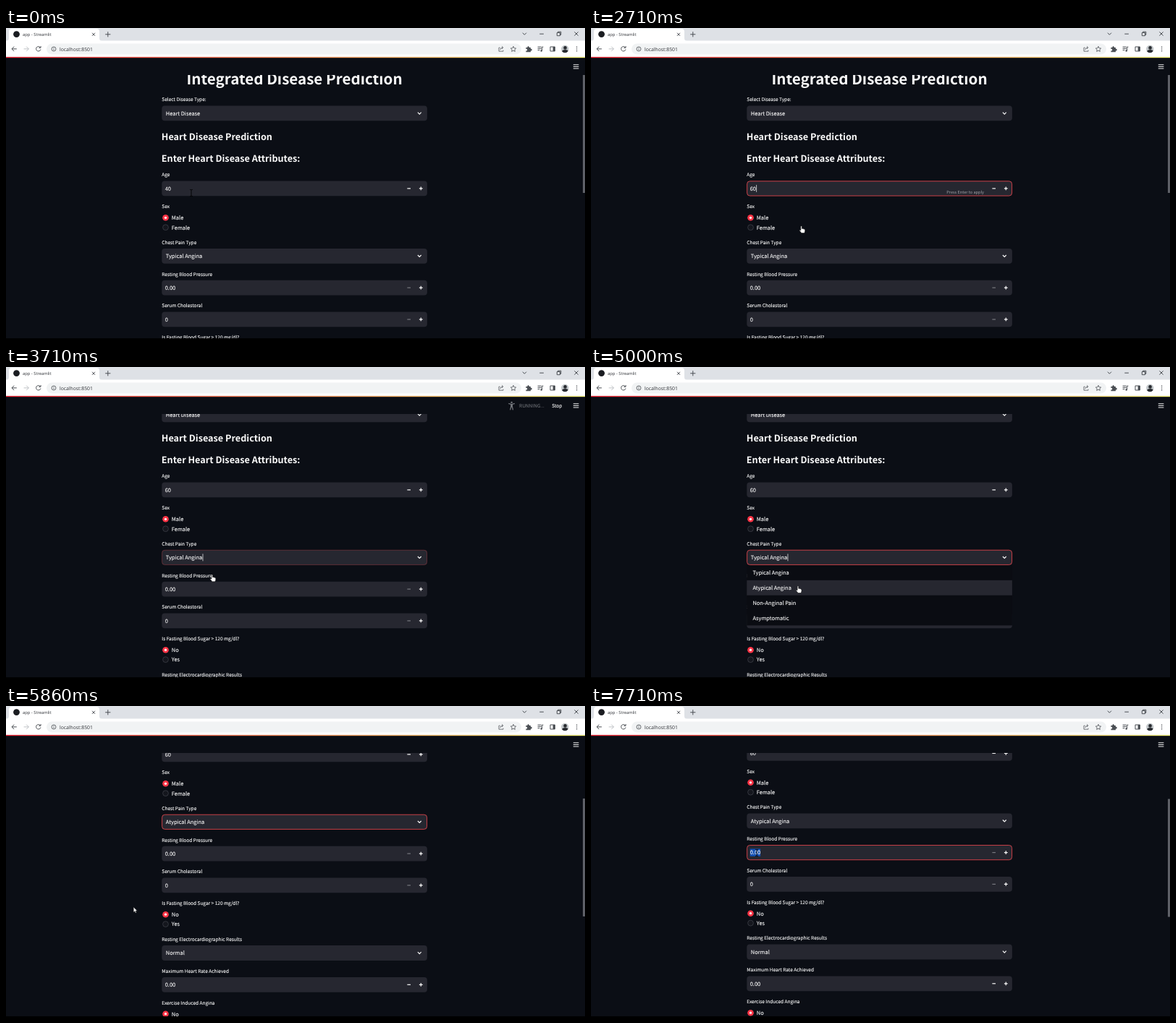
Recreate the animation shown at these times as an HTML page. Size 800x430 px, loop 8000 ms.

```html
<!DOCTYPE html>
<html lang="en">
<head>
<meta charset="utf-8">
<title>Disease prediction form</title>
<style>
  html, body { margin: 0; width: 100%; height: 100%; overflow: hidden; background: #0b0e15; }
  svg { display: block; width: 800px; height: 430px; }
  text { font-family: "Noto Sans CJK JP", "Noto Sans CJK SC", "Noto Sans CJK", "Noto Sans", sans-serif;
         fill: #fafafa; text-rendering: geometricPrecision; white-space: pre; }
  .h1 { font-size: 20.6px; font-weight: 700; }
  .h3 { font-size: 12.67px; font-weight: 700; }
  .label { font-size: 6.52px; stroke: #fafafa; stroke-width: .12px; }
  .value { font-size: 7.45px; stroke: #fafafa; stroke-width: .1px; }
  .hint { font-size: 5.6px; fill: #a2a3a8; text-anchor: end; }
  .ui { font-family: "Open Sans", "Noto Sans", sans-serif; fill: #303338; }
  .line { fill: none; stroke: #4b4f54; stroke-width: 1; }
  .box { fill: #262730; }
  .ring { fill: none; stroke: #f0464c; stroke-width: .8; }
</style>
</head>
<body>
<svg viewBox="0 0 800 430">
  <defs>
    <linearGradient id="stripe">
      <stop offset="0" stop-color="#ff2b3c"/><stop offset="1" stop-color="#fffd80"/>
    </linearGradient>
    <clipPath id="face"><circle cx="772.3" cy="29" r="5.2"/></clipPath>
  </defs>
  <rect width="800" height="430" fill="#0b0e15"/>
  <g id="page"></g>

  <g id="header">
    <rect y="40" width="800" height="25" fill="#0b0e15"/>
    <rect y="39.8" width="800" height="1.4" fill="url(#stripe)"/>
    <path d="M783.8 50.8h7.6M783.8 53.4h7.6M783.8 56h7.6" stroke="#f0f0f0" stroke-width="1"/>
    <g id="running">
      <g fill="none" stroke="#74777c" stroke-width="1.3" stroke-linecap="round">
        <path d="M694.8 50.6l3.8 1 3.8-1M698.6 51.6v3.4M697.8 52v3l-1 3.9M699.4 52v3l1 3.9"/>
      </g>
      <circle cx="698.6" cy="48.9" r="1.2" fill="#74777c"/>
      <text class="label" x="709" y="55.6" style="fill:#7b7e83;stroke:none">RUNNING...</text>
      <text class="label" x="754.3" y="55.6">Stop</text>
    </g>
  </g>
  <rect id="thumb" x="797" width="3" height="163" fill="#5e6067"/>
  <rect y="429" width="800" height="1" fill="#000"/>

  <g id="browser">
    <rect width="800" height="18" fill="#dee1e6"/>
    <rect y="17.5" width="800" height="22.4" fill="#fff"/>
    <path d="M0 18Q4 18 4 14V5Q4 1 8 1H125Q129 1 129 5V14Q129 18 133 18Z" fill="#fff"/>
    <circle cx="14.5" cy="8.6" r="4.4" fill="#1b1d22"/>
    <text class="ui" x="23" y="10.9" font-size="5.8">app - Streamlit</text>
    <path class="line" d="M119 6.8l4 4m0-4l-4 4M137.2 8.8h7.2M140.8 5.2v7.2"/>
    <path class="line" d="M713.8 6.7l2.6 2.6 2.6-2.6M737.3 8.2h5.6M785.4 5.4l5.2 5.2m0-5.2l-5.2 5.2"/>
    <path class="line" d="M761.3 6.5h4.2v4.2h-4.2zM762.6 6.3v-1.1h4.2v4.2h-1.1" stroke-width=".8"/>
    <rect x="56" y="21.4" width="656" height="15.2" rx="7.6" fill="#f1f3f4"/>
    <path class="line" d="M14.8 28.9h-6.8m3.2-3.2l-3.2 3.2 3.2 3.2"/>
    <path class="line" d="M24.6 28.9h6.8m-3.2-3.2l3.2 3.2-3.2 3.2" style="stroke:#bfc2c6"/>
    <path class="line" d="M47.1 26.6a3.2 3.2 0 1 0 .8 3M48 25v2.4h-2.5"/>
    <circle class="line" cx="66" cy="29" r="3" style="stroke-width:.8"/>
    <path class="line" d="M66 28.5v2.2M66 26.9v.8" style="stroke-width:.8"/>
    <text class="ui" x="74" y="31.5" font-size="6.8">localhost:8501</text>
    <path class="line" d="M682.6 27.2h-1.6v5h6v-1.6M682.8 30.2q.3-3 3.4-3.1m-1.2-1.8l2 1.8-2 1.8" style="stroke-width:.75"/>
    <path class="line" d="M701 25.4l1.1 2.4 2.6.3-1.9 1.8.5 2.6-2.3-1.3-2.3 1.3.5-2.6-1.9-1.8 2.6-.3z" style="stroke-width:.8"/>
    <path d="M718.4 27h2a1.3 1.3 0 1 1 2.5 0h2v2a1.3 1.3 0 1 1 0 2.4v1.9h-6.5v-1.9a1.3 1.3 0 1 0 0-2.4z" fill="#4b4f54"/>
    <path class="line" d="M734.6 26.2h5M734.6 28.4h5M734.6 30.6h2.8M740.6 31.6v-5.4h1.8"/>
    <circle cx="739.7" cy="31.5" r="1.2" fill="#4b4f54"/>
    <path class="line" d="M752 26h6.4v6h-6.4z"/>
    <path d="M755.6 26h2.8v6h-2.8z" fill="#4b4f54"/>
    <g clip-path="url(#face)">
      <rect x="766" y="23" width="13" height="12" fill="#c3c8cb"/>
      <circle cx="772.6" cy="27.4" r="2.3" fill="#282b30"/>
      <path d="M767 35q.6-5 5.6-5t5.6 5z" fill="#282b30"/>
    </g>
    <g fill="#4b4f54"><circle cx="788.6" cy="26.3" r=".8"/><circle cx="788.6" cy="29" r=".8"/><circle cx="788.6" cy="31.7" r=".8"/></g>
  </g>

  <g id="beam" class="cursor" fill="none" stroke="#000" stroke-width=".9">
    <path d="M-1.8-4.6Q0-4.6 0-3.8Q0-4.6 1.8-4.6M0-3.8V3.8M-1.8 4.6Q0 4.6 0 3.8Q0 4.6 1.8 4.6"/>
  </g>
  <path id="hand" class="cursor" fill="#fff" stroke="#111" stroke-width=".6" stroke-linejoin="round"
    d="M-1.9-4.6Q-.9-5.6-.2-4.4V-1.3Q1-2 1.6-1Q2.6-1.5 3-.5Q4-.8 4 .5V2.2Q3.8 3.6 3 4.8H-1Q-2 3.2-3.8 1.3Q-3.6 0-1.9 1Z"/>
  <path id="arrow" class="cursor" fill="#fff" stroke="#111" stroke-width=".5" stroke-linejoin="round"
    d="M0 0V7.2L1.7 5.7L2.8 8.2L4 7.6L2.9 5.2H5.2Z"/>
</svg>

<script>
const LEFT = 215.3, WIDTH = 366.6, HALF = 10.4, ROW = 20.83, LIST_TOP = 326;
const LOOP = 8000, STEP = 1000 / 7;
const $ = id => document.getElementById(id);

const text = (cls, x, y, s, extra = "") => `<text class="${cls}" x="${x}" y="${y}" ${extra}>${s}</text>`;
const rect = (cls, x, y, w, h, extra = "") =>
  `<rect class="${cls}" x="${x}" y="${y}" width="${w}" height="${h}" ${extra}/>`;

// Each control is placed by the middle of its label.
function boxed(y, label, id, value, x, icons) {
  const mid = y + 18.9;
  return text("label", 215.3, y + 2.3, label)
    + rect("box", LEFT, mid - HALF, WIDTH, HALF * 2, 'rx="4"')
    + rect("ring", LEFT + .3, mid - HALF + .3, WIDTH - .6, HALF * 2 - .6, `rx="4" id="${id}Ring" opacity="0"`)
    + rect("mark", x, mid - 5.2, 0, 10.4, `id="${id}Mark" fill="#1450b4"`)
    + text("value", x, mid + 2.8, value, `id="${id}"`)
    + rect("caret", x, mid - 5, .7, 10, `id="${id}Caret" fill="#fafafa" opacity="0"`)
    + icons(mid);
}
const select = (y, label, id, value) => boxed(y, label, id, value, 220.8, mid =>
  `<path d="M568.9 ${mid - 1.3}l2.4 2.5 2.4-2.5" fill="none" stroke="#fafafa" stroke-width="1.2"/>`);
const number = (y, label, id, value, atMin) => boxed(y, label, id, value, 219.7, mid =>
  `<path d="M554.4 ${mid}h4.6" stroke="${atMin ? "#77787f" : "#fafafa"}" stroke-width="1.2"/>
   <path d="M570.9 ${mid}h4.8M573.3 ${mid - 2.4}v4.8" stroke="#fafafa" stroke-width="1.2"/>`);
const radio = (y, label, options) => text("label", 215.3, y + 2.3, label) + options.map((name, i) => {
  const mid = y + 15.4 + i * 13.4;
  const dot = i ? `<circle cx="220.5" cy="${mid}" r="3.9" fill="#14161d" stroke="#43454e" stroke-width=".7"/>`
    : `<circle cx="220.5" cy="${mid}" r="4.3" fill="#ff3446"/><circle cx="220.5" cy="${mid}" r="1.6" fill="#fff"/>`;
  return dot + text("value", 228.8, mid + 2.8, name);
}).join("");

const pains = ["Typical Angina", "Atypical Angina", "Non-Anginal Pain", "Asymptomatic"];
const list = `<g id="list">${rect("", LEFT, LIST_TOP, WIDTH, ROW * 4, 'fill="#0a0c12"')}
  ${rect("box", LEFT, LIST_TOP, WIDTH, ROW, 'id="hover"')}
  ${pains.map((name, i) => text("value", 223.4, LIST_TOP + ROW * (i + .5) + 2.8, name)).join("")}</g>`;

$("page").innerHTML =
  text("h1", 398.6, 78.3, "Integrated Disease Prediction", 'text-anchor="middle"')
  + select(99, "Select Disease Type:", "disease", "Heart Disease")
  + text("h3", 214.8, 154.6, "Heart Disease Prediction")
  + text("h3", 214.8, 184.8, "Enter Heart Disease Attributes:")
  + number(203, "Age", "age", "40")
  + text("hint", 543, 229.2, "Press Enter to apply", 'id="hint"')
  + radio(246.9, "Sex", ["Male", "Female"])
  + select(296.4, "Chest Pain Type", "chest", pains[0])
  + number(340.2, "Resting Blood Pressure", "pressure", "0.00", true)
  + number(384, "Serum Cholestoral", "serum", "0", true)
  + radio(427.8, "Is Fasting Blood Sugar &gt; 120 mg/dl?", ["No", "Yes"])
  + select(477.6, "Resting Electrocardiographic Results", "ecg", "Normal")
  + number(521.4, "Maximum Heart Rate Achieved", "rate", "0.00")
  + radio(565.3, "Exercise Induced Angina", ["No", "Yes"])
  + list;

// Key points: step, then values.
const scrollKeys = [[19, 0], [20, 9], [21, 40], [22, 52], [38, 52], [39, 55], [40, 112], [41, 155], [42, 156.5]];
const pointerKeys = [
  [0, 256, 228], [1, 250, 210], [3, 212, 221], [10, 212, 221], [17, 293, 285], [19, 291.7, 278.8],
  [22, 290, 275], [25, 286, 266], [26, 285.8, 292], [27, 286, 287], [30, 285, 286], [33, 286, 303],
  [35, 287, 307.7], [36, 262, 303], [38, 179, 281], [39, 176.2, 278], [42, 176.2, 278],
  [47, 256, 205], [50, 254, 203], [54, 229, 203]
];

function at(keys, k) {
  const next = keys.findIndex(key => key[0] > k);
  if (next < 0) return keys[keys.length - 1].slice(1);
  if (next === 0) return keys[0].slice(1);
  const a = keys[next - 1], b = keys[next], f = (k - a[0]) / (b[0] - a[0]);
  return a.slice(1).map((v, i) => v + (b[i + 1] - v) * f);
}

const show = (id, on) => $(id).setAttribute("opacity", Number(on));
const set = (id, s) => { if ($(id).textContent !== s) $(id).textContent = s; };
const between = (k, from, to) => k >= from && k < to;
const blink = (k, from) => Math.floor((k - from) * STEP / 530) % 2 === 0;

function caret(id, on) {
  const x = Number($(id).getAttribute("x")) + $(id).getComputedTextLength();
  $(id + "Caret").setAttribute("x", x + .4);
  show(id + "Caret", on);
}
function mark(id, on) {
  $(id + "Mark").setAttribute("width", on ? $(id).getComputedTextLength() : 0);
}

function draw(k) {
  const [scroll] = at(scrollKeys, k), [x, y] = at(pointerKeys, k);
  $("page").setAttribute("transform", `translate(0 ${-scroll})`);
  $("thumb").setAttribute("y", 65 + scroll * .406);
  show("thumb", !between(k, 26, 36));
  show("running", between(k, 26, 31) || between(k, 37, 39));

  set("age", k < 10 ? "40" : k < 11 ? "6" : "60");
  show("ageRing", between(k, 2, 26));
  show("hint", between(k, 10, 26));
  mark("age", between(k, 3, 10));
  caret("age", between(k, 10, 26) && blink(k, 11));

  set("chest", k < 36 ? pains[0] : pains[1]);
  show("chestRing", k === 26 ? .35 : between(k, 27, 51));
  caret("chest", between(k, 26, 51) && blink(k, k < 36 ? 26 : 36));
  show("list", between(k, 27, 36));
  const row = Math.max(0, Math.min(3, Math.floor((y - 5 + scroll - LIST_TOP) / ROW)));
  $("hover").setAttribute("y", LIST_TOP + row * ROW);

  show("pressureRing", k >= 51);
  mark("pressure", k >= 53);
  caret("pressure", between(k, 51, 53));

  const shape = k < 13 || k >= 46 ? "beam" : k < 36 ? "hand" : "arrow";
  for (const id of ["beam", "hand", "arrow"]) {
    show(id, id === shape);
    $(id).setAttribute("transform", `translate(${x} ${y})`);
  }
}

const start = performance.now();
function tick() {
  const t = (performance.now() - start) % LOOP;
  draw(Math.min(54, Math.floor((t + 5) / STEP)));
  requestAnimationFrame(tick);
}
tick();
</script>
</body>
</html>
```
